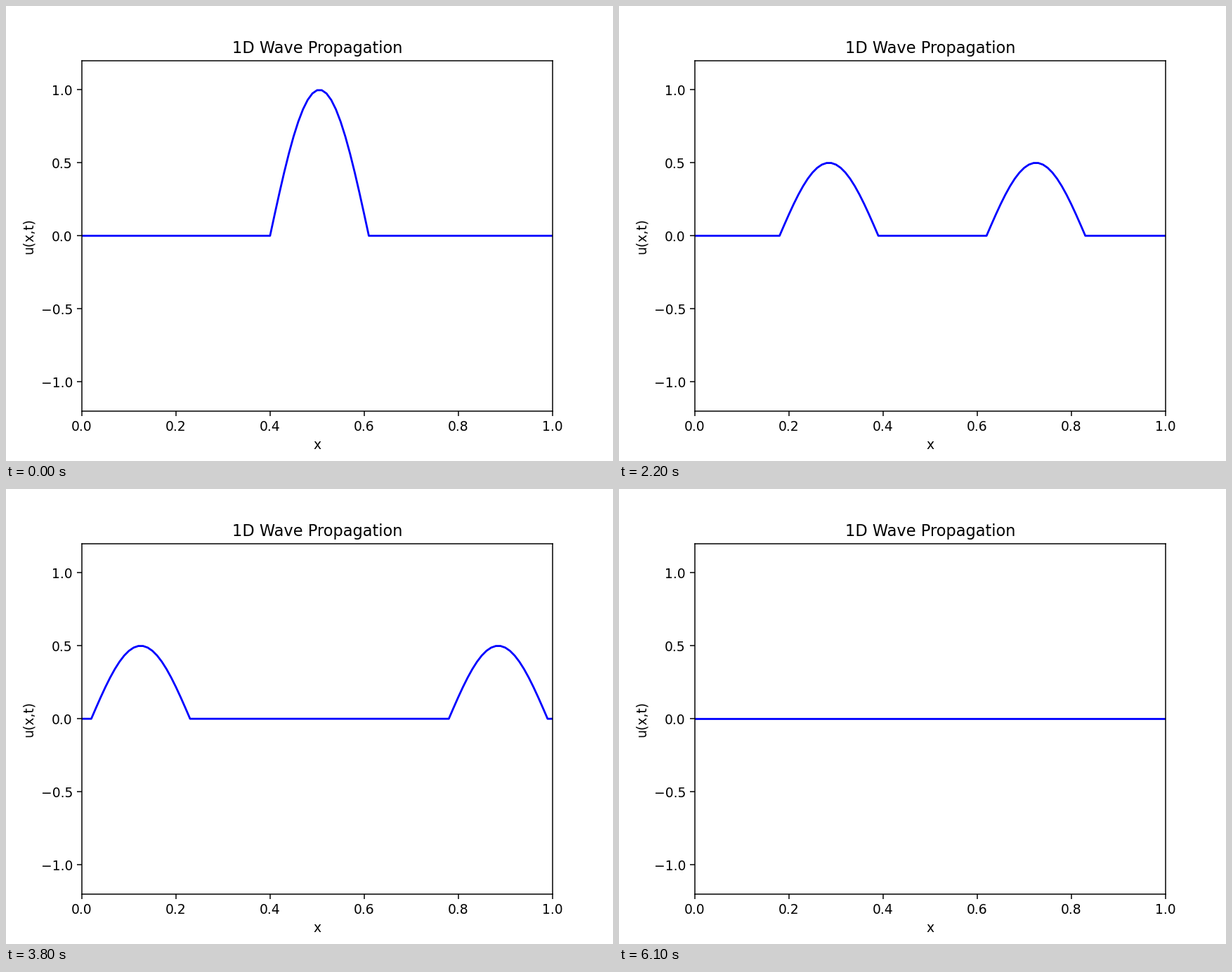
Animation of 864x648 px, one loop 8000 ms. Source, as a matplotlib script:

```python
import numpy as np
import matplotlib.pyplot as plt
from matplotlib.animation import FuncAnimation

FRAMES, INTERVAL = 80, 100
START, WIDTH = 40, 21  # pulse position and width in grid cells

cells = np.arange(101)
x = cells / 100


def pulse(shift):
    """Half-sine pulse moved by a whole number of cells."""
    k = cells - START - shift
    return np.where((k > 0) & (k < WIDTH), np.sin(np.pi * k / WIDTH), 0.0)


def wave(step):
    """Two half-height pulses run apart and leave through open ends."""
    return 0.5 * (pulse(step) + pulse(-step))


fig, ax = plt.subplots(figsize=(6.4, 4.8), dpi=135)
ax.set_xlim(0, 1)
ax.set_ylim(-1.2, 1.2)
ax.set_title("1D Wave Propagation")
ax.set_xlabel("x")
ax.set_ylabel("u(x,t)")
line, = ax.plot(x, wave(0), color="blue", lw=1.5)


def update(step):
    line.set_ydata(wave(step))
    return line,


anim = FuncAnimation(fig, update, frames=FRAMES, interval=INTERVAL,
                     repeat=True, repeat_delay=0)
plt.show()
```
